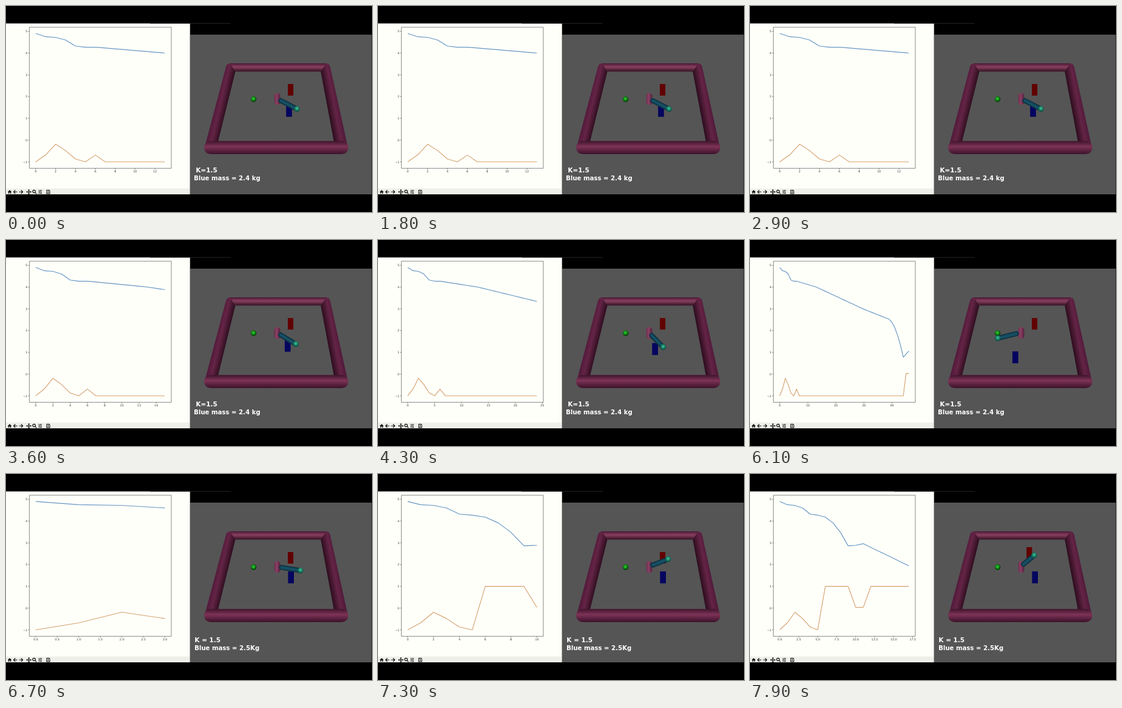
These frames come from a looping animation (600x338 px, 8 s). An HTML page:

```html
<!DOCTYPE html>
<html lang="en">
<head>
<meta charset="utf-8">
<title>Robot arm learning</title>
<style>
  html, body { margin: 0; width: 100%; height: 100%; overflow: hidden; background: #000; }
  svg { display: block; width: 600px; height: 338px; }
  .plot text { font: 4.8px "DejaVu Sans", sans-serif; fill: #333; }
  .caption { font: bold 10.1px "DejaVu Sans", sans-serif; fill: #fff; }
  #gain { font-size: 10.4px; }
  .curve { fill: none; stroke-width: 1.15; stroke-linejoin: round; }
  .axis { fill: none; stroke: #555; stroke-width: .7; }
  .icons { fill: none; stroke: #111; stroke-width: 1.2; }
</style>
</head>
<body>
<svg viewBox="0 0 600 338">
  <defs>
    <linearGradient id="back" x2="0" y2="1">
      <stop stop-color="#4a1935"/><stop offset=".45" stop-color="#88405f"/><stop offset="1" stop-color="#351023"/>
    </linearGradient>
    <linearGradient id="front" x2="0" y2="1">
      <stop stop-color="#3f142c"/><stop offset=".42" stop-color="#7d3357"/><stop offset="1" stop-color="#3c122a"/>
    </linearGradient>
    <linearGradient id="left" gradientUnits="userSpaceOnUse" x1="342" y1="164" x2="363" y2="169">
      <stop stop-color="#50193a"/><stop offset=".4" stop-color="#642445"/><stop offset="1" stop-color="#260a1a"/>
    </linearGradient>
    <linearGradient id="right" gradientUnits="userSpaceOnUse" x1="526" y1="168" x2="547" y2="164">
      <stop stop-color="#260a1a"/><stop offset=".6" stop-color="#642445"/><stop offset="1" stop-color="#50193a"/>
    </linearGradient>
    <linearGradient id="post">
      <stop stop-color="#6b2c4c"/><stop offset=".4" stop-color="#8a4165"/><stop offset="1" stop-color="#54203b"/>
    </linearGradient>
    <radialGradient id="goal" cx=".45" cy=".4">
      <stop stop-color="#3fd23f"/><stop offset=".5" stop-color="#129a16"/><stop offset="1" stop-color="#07450a"/>
    </radialGradient>
    <radialGradient id="tip" cx=".5" cy=".4">
      <stop stop-color="#4cc79c"/><stop offset=".5" stop-color="#208f70"/><stop offset="1" stop-color="#0f5145"/>
    </radialGradient>
  </defs>

  <path d="M236 28.5H368" stroke="#222"/>
  <path d="M302 47H599.500V309H302z" fill="#555"/>

  <!-- arena -->
  <path d="M368 94Q362 94 360.500 100L325 234L347 225L376 107.500z" fill="url(#left)"/>
  <path d="M524 94Q530 94 531.500 100L561 234L538 225L516 107.500z" fill="url(#right)"/>
  <path d="M367 94H525L516 107.500H376z" fill="url(#back)"/>
  <rect x="325" y="221.500" width="236" height="21.500" rx="10" fill="url(#front)"/>

  <circle cx="406" cy="153" r="4.700" fill="url(#goal)"/>
  <path id="redBox" d="M-4.500-9.500H4.600V9.500H-4.500z" fill="#610202"/>
  <path id="blueBox" d="M-4.800-9.800H4.800V9.800H-4.800z" fill="#050560"/>
  <rect x="439.700" y="143" width="9.800" height="19" rx="4.600" fill="url(#post)"/>
  <g stroke-linecap="round">
    <path id="armEdge" stroke="#0e3342" stroke-width="8.200"/>
    <path id="arm" stroke="#164f64" stroke-width="4.500"/>
  </g>
  <circle id="ball" r="4.800" fill="url(#tip)"/>

  <text class="caption" id="gain"/>
  <text class="caption" id="mass"/>

  <!-- plot window -->
  <path d="M0 28H236V29H0z" fill="#666"/>
  <path d="M0 29H301V309H0z" fill="#fffffa"/>
  <path d="M0 299.500H301V309H0z" fill="#efefea"/>
  <path d="M301 29H302V309H301z" fill="#a8a8a4"/>
  <g class="plot">
    <path class="axis" d="M38.300 34.800H271V266.300H38.300z"/>
    <g id="yTicks"/>
    <g id="xTicks"/>
    <path class="curve" id="blue" stroke="#6596c2"/>
    <path class="curve" id="orange" stroke="#d5a26e"/>
  </g>
  <g class="icons">
    <path d="M2.500 305.300L6 302L9.500 305.300H8.200V308H6.800V306H5.200V308H3.800V305z" fill="#111" stroke="none"/>
    <path d="M18.500 305H12.500M15.300 302.200L12.500 305L15.300 307.800M21.500 305H27.500M24.700 302.200L27.500 305L24.700 307.800"/>
    <path d="M34 305H41M37.500 301.500V308.500M35 304L34 305L35 306M40 304L41 305L40 306M36.500 302.500L37.500 301.500L38.500 302.500M36.500 307.500L37.500 308.500L38.500 307.500"/>
    <circle cx="46" cy="304.300" r="2.200"/><path d="M47.600 305.900L50 308.300"/>
    <path d="M53 302.700H59M53 305H59M53 307.300H59M57 301.800v1.800M55 304.100v1.800M57.500 306.400v1.800" stroke-width=".8"/>
    <path d="M66.500 302H71L72 303V308H66.500zM68 302V304H70.500V302M67.800 308V306H70.800V308" stroke-width=".8"/>
  </g>
</svg>
<script>
const $ = id => document.getElementById(id);
const STEPS_PER_MS = 0.0122, CUT = 6450;

// Rises from 0 at step a to 1 at step b.
const ramp = (n, a, b) => Math.min(1, Math.max(0, (n - a) / (b - a)));

// Both runs open with the same samples.
const openBlue = [4.9, 4.75, 4.72, 4.6, 4.32, 4.27];
const openOrange = [-1, -.68, -.19, -.48, -.87, -1];

// The arm sweeps slowly, then swings round to the goal and stops there.
const sweepRun = {
  step: t => Math.max(13, 15.6 + (t - 3600) * STEPS_PER_MS),
  gain: ["K=1.5", 311.3, 272.8], mass: ["Blue mass = 2.4 kg", 308, 285.6],
  blue: n => 4.27 - .27 * ramp(n, 6, 13) - 1.02 * ramp(n, 13, 30) - .41 * ramp(n, 30, 38)
    - 1.79 * ramp(n, 38, 44) ** 2 + .28 * ramp(n, 44, 46),
  orange: n => n === 6 ? -.69 : n < 45 ? -1 : .03,
  angle: n => Math.min(166, 32.5 + 1.84 * (n - 13) + 75 * ramp(n, 38, 44) ** 2),
  redBox: () => [466.5, 137.5],
  blueBox: n => [464 - 29 * ramp(n, 13, 46), 172 + 20.5 * ramp(n, 13, 46)]
};

// The arm turns back, hits the red box, pauses and pushes it away.
const pushRun = {
  step: t => Math.max(1, 3.1 + (t - 6700) * STEPS_PER_MS),
  gain: ["K = 1.5", 309.3, 276], mass: ["Blue mass = 2.5Kg", 309, 288.5],
  blue: n => 4.27 - 1.41 * ramp(n, 5, 9) ** 2 + .1 * ramp(n, 9, 11) ** 2 - 1.02 * ramp(n, 11, 17),
  orange: n => n === 10 || n === 11 ? .03 : 1,
  angle: n => 12 * ramp(n, 0, 5) - 48 * ramp(n, 5, 9) ** 2 - 20 * ramp(n, 11, 17.7),
  redBox: n => [466.5 - 8.7 * ramp(n, 11, 17.7), 137.5 - 8 * ramp(n, 11, 17.7)],
  blueBox: () => [467.2, 169.6]
};

const plotY = v => 220 - v * 35.7;
const label = (x, y, text, anchor) => `<text x="${x}" y="${y}" text-anchor="${anchor}">${text}</text>`;

for (let v = -1; v <= 5; v++) {
  const y = plotY(v);
  $("yTicks").innerHTML += `<path class="axis" d="M36.300 ${y}h2"/>` +
    label(35, y + 1.8, String(v).replace("-", "\u2212"), "end");
}

function tickStep(range) {
  for (let unit = .1; ; unit *= 10)
    for (const m of [1, 2, 2.5, 5])
      if (range / (m * unit) <= 9) return m * unit;
}

function drawPlot(run, n) {
  const plotX = i => 48.7 + i * 211.8 / n;
  const curve = (open, rule) =>
    "M" + Array.from({ length: n + 1 }, (_, i) => plotX(i) + " " + plotY(open[i] ?? rule(i))).join("L");
  $("blue").setAttribute("d", curve(openBlue, run.blue));
  $("orange").setAttribute("d", curve(openOrange, run.orange));

  const step = tickStep(n * 1.1);
  const digits = [0, 1, 2].find(d => Math.abs(step - step.toFixed(d)) < 1e-6);
  let ticks = "";
  for (let v = 0; v <= n * 1.05; v += step)
    ticks += `<path class="axis" d="M${plotX(v)} 266.300v2"/>` + label(plotX(v), 273, v.toFixed(digits), "middle");
  $("xTicks").innerHTML = ticks;
}

function drawScene(run, n) {
  const a = run.angle(n) * Math.PI / 180;
  const dx = 39 * Math.cos(a), dy = 26 * Math.sin(a);
  const x = 444 + dx, y = 155 + dy;
  const d = `M${444 + dx * .2} ${152.5 + dy * .2}L${x} ${y}`;
  $("arm").setAttribute("d", d);
  $("armEdge").setAttribute("d", d);
  $("ball").setAttribute("transform", `translate(${x} ${y})`);
  for (const box of ["redBox", "blueBox"])
    $(box).setAttribute("transform", `translate(${run[box](n)})`);
  for (const id of ["gain", "mass"]) {
    const [text, left, base] = run[id];
    $(id).textContent = text;
    $(id).setAttribute("x", left);
    $(id).setAttribute("y", base);
  }
}

function frame() {
  const t = Math.floor(performance.now() % 8000 / 100) * 100;
  const run = t < CUT ? sweepRun : pushRun;
  const n = run.step(t);
  drawPlot(run, Math.floor(n));
  drawScene(run, n);
  requestAnimationFrame(frame);
}
frame();
</script>
</body>
</html>
```
